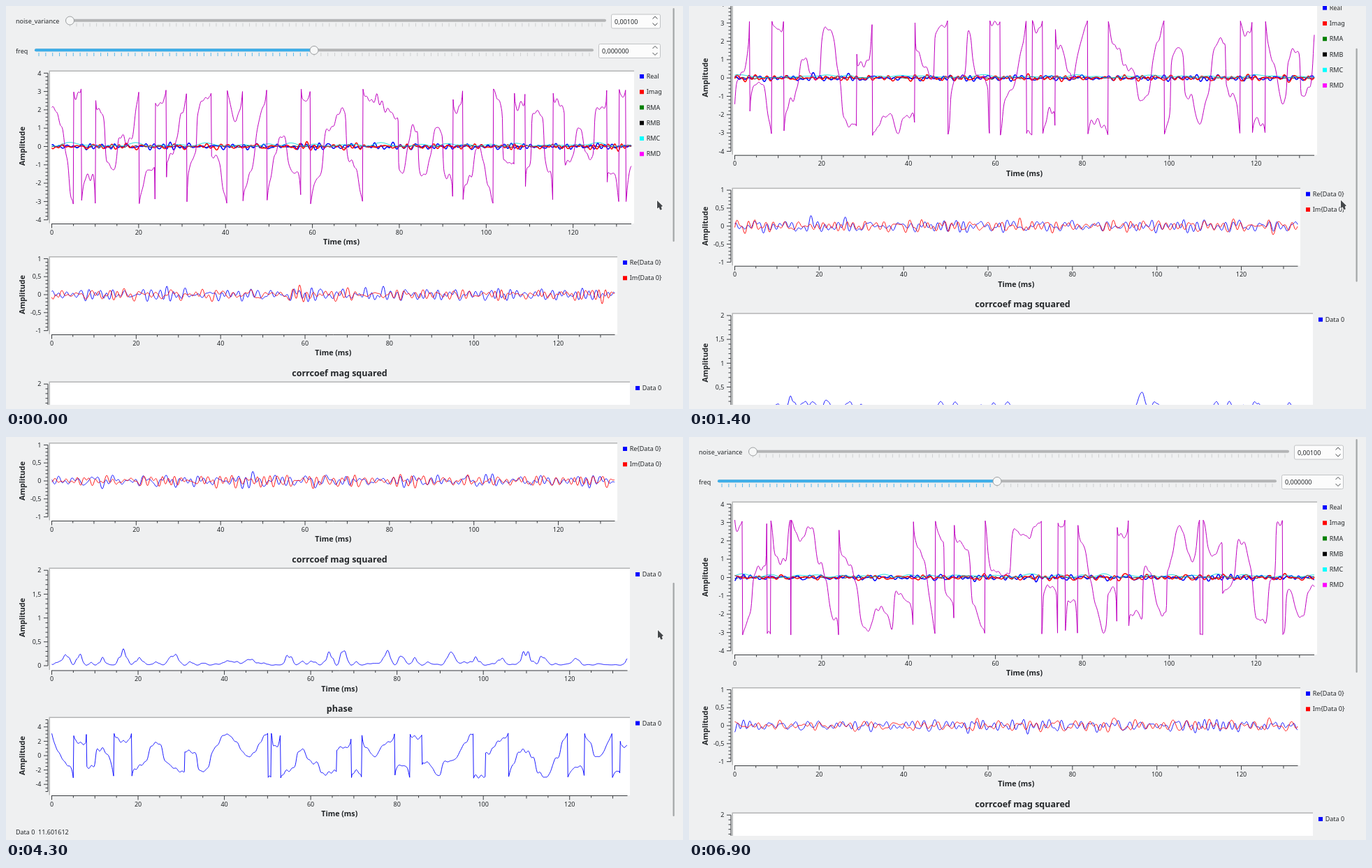
Recreate the animation shown at these times as an HTML page with a canvas. Size 969 by 578 pixels, loop 7 s.

```html
<!DOCTYPE html>
<html lang="en">
<head>
<meta charset="utf-8">
<title>Correlation scope</title>
<style>
html, body { margin: 0; width: 100%; height: 100%; overflow: hidden; background: #eff0f1; }
canvas { display: block; }
</style>
</head>
<body>
<canvas id="stage" width="969" height="578"></canvas>
<script>
const g = document.getElementById('stage').getContext('2d');
const LOOP = 7000, VIEW_H = 572, LEFT = 65.5, SPAN = 133.4;
const FONT = '"Noto Sans", "Open Sans", sans-serif';
const BLUE = '#00f', RED = '#f00', CYAN = '#0ff', INK = '#232629';

const range = (from, to, by) => Array.from({ length: (to - from) / by + 1 }, (_, i) => from + i * by);

// Times at which the screen refreshes
const STEPS = [0, 100, 400, ...range(600, 2000, 100), ...range(2200, 2600, 100),
  4300, 4900, 5400, 5500, 6000, 6300, 6900];
// [time, scroll offset], sampled at each refresh
const SCROLL = [[500, 0], [1000, 40.5], [1300, 81], [2000, 202], [2600, 283], [4300, 351],
  [4900, 202], [5400, 27.5], [5500, 0]];
// [time, x, y], held until the next entry
const POINTER = [[0, 932, 279], [100, 933, 278.5], [4300, 933, 277], [5400, 933, 276],
  [6000, 945, 230], [6300, 885, -6], [6900, -50, -50]];

function rng(seed) {
  let a = seed * 7919 + 13;
  return () => {
    a = a + 0x6D2B79F5 | 0;
    let t = Math.imul(a ^ a >>> 15, 1 | a);
    t = t + Math.imul(t ^ t >>> 7, 61 | t) ^ t;
    return ((t ^ t >>> 14) >>> 0) / 4294967296;
  };
}

// Noise of unit deviation with wavelengths between short and long
function hum(rand, short, long, n = 14) {
  const waves = Array.from({ length: n }, () =>
    [2 * Math.PI * (1 / long + rand() * (1 / short - 1 / long)), rand() * 7]);
  return x => waves.reduce((sum, [k, p]) => sum + Math.sin(k * x + p), 0) / Math.sqrt(n / 2);
}

const wrap = a => a - 2 * Math.PI * Math.round(a / (2 * Math.PI));

// Phase and squared magnitude belong to one slowly drifting complex number.
function makeData(seed) {
  const rand = rng(seed);
  const re = hum(rand, 8, 50), im = hum(rand, 8, 50);
  const a = hum(rand, 28, 300), b = hum(rand, 28, 300);
  const ripple = hum(rand, 7, 35), slow = hum(rand, 30, 160), tiny = hum(rand, 9, 40);
  return {
    re: x => re(x) * .077,
    im: x => im(x) * .077,
    small: x => tiny(x) * .03,
    level: x => Math.max(.02, .08 + slow(x) * .05),
    phase: x => wrap(Math.atan2(b(x), a(x)) + ripple(x) * .1),
    corr: x => .01 + (a(x) ** 2 + b(x) ** 2) * .035 * Math.max(.5, 1 + ripple(x) * .12)
  };
}

const CHARTS = [
  { top: 92.5, base: 312.5, right: 899, end: 895, zero: 201.5, unit: 26.3, lo: -4, hi: 4, step: 1, minor: .2, mid: 201,
    lx: 907, ly: 101,
    legend: [['Real', BLUE], ['Imag', RED], ['RMA', '#008000'], ['RMB', '#000'], ['RMC', CYAN], ['RMD', '#f0f']],
    lines: [['small', '#000', 1], ['re', BLUE, 1.5], ['im', RED, 1.5], ['level', '#00d8d8', 1], ['phase', '#bf00bf', 1]] },
  { top: 359, base: 471.5, right: 875, end: 871.5, zero: 414, unit: 51.6, lo: -1, hi: 1, step: .5, minor: .1, mid: 414,
    lx: 883, ly: 368, legend: [['Re{Data 0}', BLUE], ['Im{Data 0}', RED]],
    lines: [['re', BLUE, .9], ['im', RED, .9]] },
  { top: 538.5, base: 686, right: 893, end: 889.5, zero: 679, unit: 68.4, lo: 0, hi: 2, step: .5, minor: .1, mid: 610,
    title: 'corrcoef mag squared', lx: 901, ly: 548, legend: [['Data 0', BLUE]], lines: [['corr', BLUE, .9]] },
  { top: 752.5, base: 865.5, right: 893, end: 889.5, zero: 808, unit: 10.3, lo: -5, hi: 5, step: 2, minor: .5, mid: 808,
    title: 'phase', lx: 901, ly: 761.5, legend: [['Data 0', BLUE]], lines: [['phase', BLUE, .9]] }
];

function text(str, x, y, size = 9, align = 'left', weight = 400) {
  g.font = `${weight} ${size}px ${FONT}`;
  g.textAlign = align;
  g.fillStyle = INK;
  g.fillText(str, x, y + size * .36);
}

function rect(x, y, w, h, color) {
  g.fillStyle = color;
  g.fillRect(x, y, w, h);
}

function pill(x, y, w, h, color) {
  g.beginPath();
  g.roundRect(x, y, w, h, Math.min(w, h) / 2);
  g.fillStyle = color;
  g.fill();
}

function stroke(color, width, trace) {
  g.beginPath();
  trace();
  g.strokeStyle = color;
  g.lineWidth = width;
  g.stroke();
}

function seg(x1, y1, x2, y2) {
  g.moveTo(x1, y1);
  g.lineTo(x2, y2);
}

function drawAxes(c) {
  const msX = ms => LEFT + ms * (c.end - LEFT) / SPAN;
  const valueY = v => c.zero - v * c.unit;
  stroke('#3a3d40', 1, () => {
    seg(65, c.base, c.end, c.base);
    for (let ms = 0; ms < SPAN; ms += 5)
      seg(msX(ms), c.base, msX(ms), c.base + (ms % 20 ? ms % 10 ? 3 : 4 : 6));
    seg(60, valueY(c.hi), 60, valueY(c.lo));
    const n = Math.round((c.hi - c.lo) / c.minor), per = Math.round(c.step / c.minor);
    for (let i = 0; i <= n; i++) {
      const v = c.lo + i * c.minor;
      seg(60, valueY(v), Math.round(v / c.minor) % per ? 56.5 : 54, valueY(v));
    }
  });
  for (let ms = 0; ms <= 120; ms += 20) text(ms, msX(ms), c.base + 12, 9, 'center');
  for (let v = Math.ceil(c.lo / c.step) * c.step; v <= c.hi; v += c.step)
    text(String(v).replace('.', ','), 50.5, valueY(v), 9, 'right');
  text('Time (ms)', (65 + c.end) / 2, c.base + 26, 10.7, 'center', 700);
  g.save();
  g.translate(23, c.mid);
  g.rotate(-Math.PI / 2);
  text('Amplitude', 0, 0, 10.7, 'center', 700);
  g.restore();
}

function drawChart(c, data) {
  rect(61.5, c.top, c.right - 61.5, c.base - c.top - 1, '#b4b5b6');
  rect(63, c.top + 1.5, c.right - 63, c.base - c.top - 2, '#fff');
  const w = c.end - LEFT;
  for (const [key, color, width] of c.lines)
    stroke(color, width, () => {
      for (let x = 0; x <= w; x += .75) g.lineTo(LEFT + x, c.zero - data[key](x / w * 830) * c.unit);
    });
  drawAxes(c);
  if (c.title) text(c.title, 477.5, c.top - 12.5, 12.5, 'center', 700);
  c.legend.forEach(([name, color], i) => {
    const y = c.ly + i * 22.25;
    rect(c.lx, y - 3, 6, 6, color);
    text(name, c.lx + 9.7, y);
  });
}

function drawSlider(name, y, left, right, knob, spinX, value) {
  text(name, 14, y + .5);
  pill(left, y - 2.7, right - left, 4, '#b4b5b6');
  if (knob > left + 6) pill(left, y - 2.7, knob - left, 4, '#3daee9');
  for (let i = 0; i <= 80; i++) {
    const x = left + 6 + i * (right - left - 12) / 80;
    rect(x - .5, y + 3, 1, 5, x < knob - 4 ? '#5bb9ea' : '#cfd1d2');
  }
  g.beginPath();
  g.arc(knob, y - .5, 6, 0, 7);
  g.fillStyle = '#f6f7f7';
  g.fill();
  g.strokeStyle = '#9b9ea0';
  g.lineWidth = 1;
  g.stroke();

  g.beginPath();
  g.roundRect(spinX + .5, y - 9.5, 936 - spinX, 20, 2);
  g.fillStyle = '#fcfcfc';
  g.fill();
  g.strokeStyle = '#c1c3c5';
  g.stroke();
  text(value, spinX + 5, y + .8);
  stroke('#4a4d50', 1, () => {
    for (const k of [-1, 1]) {
      g.moveTo(925.5, y + k * 3);
      g.lineTo(929, y + k * 6.5);
      g.lineTo(932.5, y + k * 3);
    }
  });
}

function drawPointer(x, y) {
  g.beginPath();
  [[0, 0], [0, 11.5], [2.6, 9.8], [4.2, 13.5], [6.8, 13], [5.8, 9], [8, 8]].forEach(p => g.lineTo(x + p[0], y + p[1]));
  g.closePath();
  g.strokeStyle = '#fff';
  g.lineWidth = 1.4;
  g.stroke();
  g.fillStyle = '#45484b';
  g.fill();
}

function scrollAt(t) {
  const i = SCROLL.findIndex(k => k[0] > t);
  if (i < 1) return 0;
  const [t0, a] = SCROLL[i - 1], [t1, b] = SCROLL[i];
  return a + (b - a) * (t - t0) / (t1 - t0);
}

function draw(t) {
  const scroll = scrollAt(t);
  const data = makeData(Math.floor((t + 200) / 300) + 1);
  rect(0, 0, 969, 578, '#eff0f1');
  g.save();
  g.beginPath();
  g.rect(0, 0, 969, VIEW_H);
  g.clip();
  g.translate(0, -scroll);
  drawSlider('noise_variance', 21.5, 85.5, 859, 91.5, 866, '0,00100');
  drawSlider('freq', 64, 41, 841, 441, 848, '0,000000');
  for (const c of CHARTS)
    if (c.top - 20 < scroll + VIEW_H && c.base + 35 > scroll) drawChart(c, data);
  text('Data 0\u00a0 11.601612', 14, 918);
  g.restore();
  pill(954.5, 3 + scroll * .587, 2.2, 335, '#a3a5a7');
  const [, x, y] = POINTER.findLast(p => p[0] <= t);
  drawPointer(x, y);
}

const start = performance.now();
let shown = -1;
function frame() {
  const t = (performance.now() - start) % LOOP;
  const step = STEPS.findLast(s => s <= t);
  if (step !== shown) draw(shown = step);
  requestAnimationFrame(frame);
}
frame();
</script>
</body>
</html>
```
